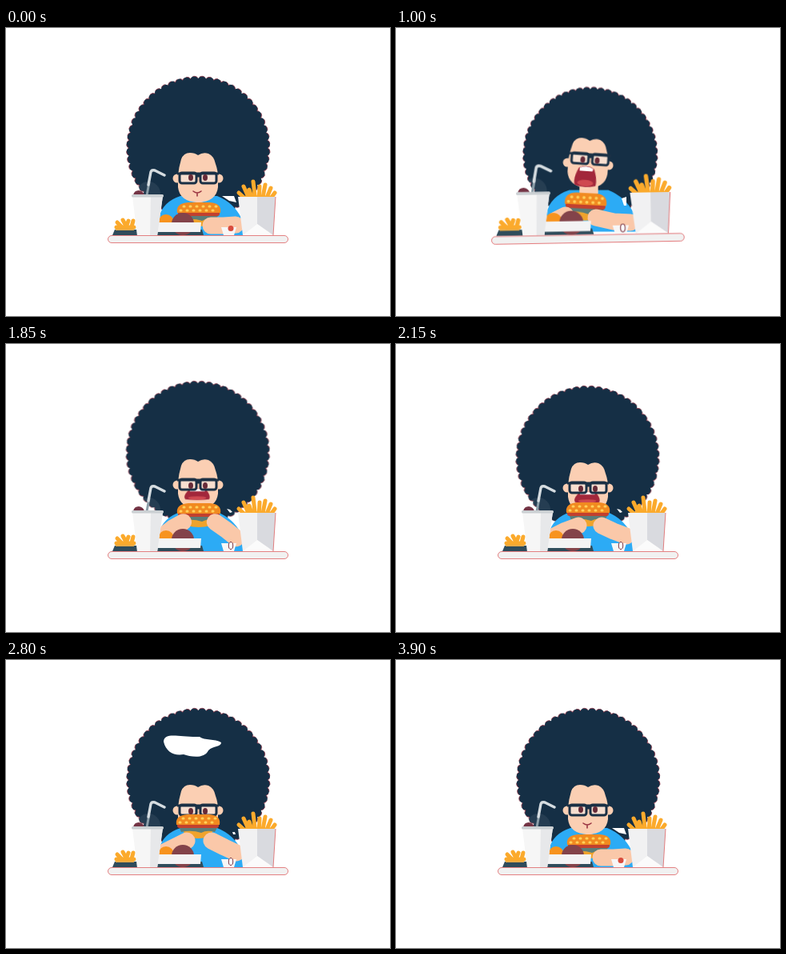
Write an HTML page that moves like this. It is 480x360 px and loops after 3950 ms.

```html
<!DOCTYPE html>
<html lang="en">
<head>
<meta charset="utf-8">
<title>Burger lunch</title>
<style>
html, body { margin: 0; width: 100%; height: 100%; overflow: hidden; background: #fff; }
svg { display: block; width: 100vw; height: 100vh; }
svg * { animation: 3950ms linear infinite; }
.skin { fill: #fbcfb3; }
.arm { fill: none; stroke: #fac8a9; stroke-width: 21; stroke-linecap: round; stroke-linejoin: round; }
.fries path { fill: none; stroke: #fbaa2c; stroke-width: 5; stroke-linecap: round; }
.edge { fill: none; stroke: #df6264; stroke-width: .8; }

#hair { animation-name: hair; transform-origin: 240px 150px; }
#shine { animation-name: shine, shine-on; animation-timing-function: linear, step-end; }
#body { animation-name: body; transform-origin: 242px 250px; }
#face { animation-name: face; transform-origin: 240px 190px; }
#glasses { animation-name: glasses; }
#pupils { animation-name: pupils; }
#bigMouth { animation-name: gape; transform-origin: 238px 204px; }
#smallMouth { animation-name: small-mouth; animation-timing-function: step-end; }
#burger { animation-name: burger; transform-origin: 241px 230px; }
#armL { animation-name: arm-left; }
#armR { animation-name: arm-right; }
#table { animation-name: table; transform-origin: 241px 264px; }
#gap { animation-name: gap; animation-timing-function: step-end; }
#dip { animation-name: dip; animation-timing-function: step-end; }
#ring { animation-name: ring; animation-timing-function: step-end; }

@keyframes hair {
  0%, 1.3%, 86%, 100% { transform: none; }
  6.3% { transform: translate(0, -4px); }
  12.7% { transform: translate(1px, 4px) scale(.96); }
  19%, 26.5% { transform: translate(2.5px, 8px) scale(.94); }
  27.8% { transform: translate(0, -3px); }
  30.4% { transform: translate(0, -16px); }
  34.2% { transform: translate(0, -6px); }
  39.2%, 40.5% { transform: translate(0, 9px); }
  46.8% { transform: translate(-.5px, -14px); }
  54.4%, 55.7% { transform: translate(-.8px, -8px); }
  58.2% { transform: translate(0, -13px); }
  63.3% { transform: translate(0, 5px); }
  70.9%, 72% { transform: none; }
  74.7% { transform: translate(0, -11px); }
  81%, 82.2% { transform: translate(-.5px, 2px); }
}
@keyframes face {
  0%, 1.3%, 70.9%, 72%, 86%, 100% { transform: none; }
  6.3% { transform: translate(0, -4px); }
  12.7% { transform: translate(0, -12px) rotate(2deg); }
  19%, 26.5% { transform: translate(0, -18px) rotate(4deg); }
  30.4% { transform: translate(0, -16px); }
  39.2%, 40.5% { transform: translate(0, 2px); }
  46.8% { transform: translate(0, -12px); }
  54.4%, 55.7% { transform: translate(0, -8px); }
  58.2% { transform: translate(0, -11px); }
  63.3% { transform: translate(0, 3px); }
  74.7% { transform: translate(0, -9px); }
  81%, 82.2% { transform: translate(0, 1px); }
}
@keyframes glasses {
  0%, 6.3%, 30.4%, 100% { transform: none; }
  19%, 26.5% { transform: translate(2px, -6px); }
}
@keyframes pupils {
  0%, 6.3%, 82%, 100% { transform: none; }
  12.7%, 72% { transform: translate(0, 2px); }
}
@keyframes gape {
  0%, 3%, 39.2%, 41%, 63.3%, 72%, 78%, 100% { transform: scale(0); }
  12.7% { transform: scale(.8, .6); }
  19%, 26.5%, 30.4% { transform: none; }
  46.8%, 55.7%, 58.2% { transform: translate(1px, -4px) scale(1.15, .55); }
  74.7% { transform: scale(.8, .4); }
}
@keyframes small-mouth {
  0%, 78%, 100% { opacity: 1; }
  3% { opacity: 0; }
}
@keyframes burger {
  0%, 1.3%, 86%, 100% { transform: none; }
  12.7% { transform: translate(-2px, -6px); }
  19%, 26.5% { transform: translate(-4px, -10px) rotate(3deg) scale(.96, 1.15); }
  30.4% { transform: translate(-1px, -15px); }
  39.2%, 40.5% { transform: translate(0, -27px); }
  46.8% { transform: translate(0, -19px); }
  54.4%, 55.7% { transform: translate(-1px, -20px); }
  58.2% { transform: translate(0, -18px); }
  63.3% { transform: translate(0, -27px); }
  70.9%, 72% { transform: translate(-1px, -25px); }
  74.7% { transform: translate(0, -19px); }
  81%, 82.2% { transform: translate(0, -5px); }
}
@keyframes arm-left {
  0%, 1.3%, 81%, 100% { d: path("M200 254L206 252L212 250"); }
  19%, 26.5% { d: path("M192 247L200 240L212 234"); }
  39.2%, 40.5% { d: path("M199 236L206 227L216 219"); }
  54.4%, 58.2% { d: path("M198 240L212 233L228 227"); }
  63.3% { d: path("M198 238L207 229L218 220"); }
  70.9%, 72% { d: path("M198 240L212 233L226 226"); }
}
@keyframes arm-right {
  0%, 1.3%, 81%, 100% { d: path("M287 246L272 247L256 247"); }
  19%, 26.5% { d: path("M293 243L272 242L250 237"); }
  39.2%, 40.5% { d: path("M288 245L278 231L265 219"); }
  54.4%, 58.2% { d: path("M288 240L272 234L257 227"); }
  63.3% { d: path("M288 244L277 232L264 220"); }
  70.9%, 72% { d: path("M288 241L273 234L257 226"); }
}
@keyframes body {
  0%, 1.3%, 30.4%, 100% { transform: none; }
  19%, 26.5% { transform: translate(0, -5px) scale(1.06); }
}
@keyframes table {
  0%, 1.3%, 27.8%, 100% { transform: none; }
  6.3% { transform: scale(1.04) rotate(.6deg); }
  12.7% { transform: scale(1.07) rotate(-1deg); }
  19% { transform: scale(1.075) rotate(.6deg); }
  24%, 26.5% { transform: translate(0, -.5px) scale(1.07) rotate(-1deg); }
}
@keyframes shine {
  0%, 72% { d: path("M197 102C198 89 218 97 242 96C248 101 261 98 269 103C269 109 259 107 253 113C248 124 231 121 222 118C210 120 200 115 197 102Z"); }
  81%, 100% { d: path("M191 95C190 75 207 76 219 75C235 73 251 76 257 88C266 93 273 98 275 105C267 110 253 112 241 117C222 118 202 118 195 114C190 111 192 104 191 95Z"); }
}
@keyframes shine-on {
  0%, 86%, 100% { opacity: 0; }
  69.6% { opacity: 1; }
}
@keyframes gap {
  0%, 78%, 100% { d: path("M270 210L285 210L288 218L279 216Z"); }
  6.3% { d: path("M282 213L288 211L288 222L285 222Z"); }
  30.4% { d: path("M274 203L279 203L285 209L280 212Z"); }
  44% { d: path("M276 206L280 207L283 210L280 211Z"); }
  63.3% { d: path("M283 215L286 215L287 218L284 218Z"); }
}
@keyframes dip {
  0%, 78%, 100% { opacity: 1; }
  6.3% { opacity: 0; }
}
@keyframes ring {
  0%, 78%, 100% { opacity: 0; }
  6.3% { opacity: 1; }
}
</style>
</head>
<body>
<svg viewBox="0 0 480 360">
  <g id="hair">
    <path id="curls" fill="#152f45" stroke="#8d3144" stroke-width=".8" stroke-dasharray="7 3"/>
    <path id="shine" fill="#fff" opacity="0" d="M197 102C198 89 218 97 242 96C248 101 261 98 269 103C269 109 259 107 253 113C248 124 231 121 222 118C210 120 200 115 197 102Z"/>
  </g>
  <g id="body">
    <path fill="#2cabf5" d="M191 259V237Q196 217 218 210H264Q284 218 294 237L297 259Z"/>
    <path class="skin" d="M230 202H252V214Q241 222 230 214Z"/>
  </g>
  <path id="gap" fill="#fff" d="M270 210L285 210L288 218L279 216Z"/>

  <g id="face">
    <circle class="skin" cx="214" cy="188" r="5.5"/>
    <circle class="skin" cx="266" cy="188" r="5.5"/>
    <path class="skin" d="M215 184Q216 174 219 164Q222 156 230 156Q236 156 240 159Q246 155 253 157Q260 160 262 170Q265 178 265 188V199Q263 217 240 218Q217 217 215 199Z"/>
    <g id="bigMouth">
      <path fill="#a2273b" d="M229 193Q239 188 248 194Q253 207 251 215Q238 219 225 215Q222 207 229 193Z"/>
      <path fill="#fff" d="M230 193Q239 189 247 194L246 197H230Z"/>
      <ellipse cx="238" cy="212" rx="10" ry="4" fill="#cf4951"/>
    </g>
    <g id="smallMouth" fill="none" stroke="#9b3542" stroke-width="1.6" stroke-linecap="round">
      <path d="M234 204Q239 208 244 204M239 206V210"/>
    </g>
    <g id="glasses">
      <g fill="#f7dfd0" stroke="#1a3045" stroke-width="3">
        <rect x="217" y="181" width="21" height="13" rx="3"/>
        <rect x="243" y="181" width="20" height="13" rx="3"/>
        <path d="M214 182H266M238 185H243"/>
      </g>
      <g id="pupils" fill="#662b38">
        <ellipse cx="231" cy="187" rx="3" ry="4"/>
        <ellipse cx="249" cy="187" rx="3" ry="4"/>
      </g>
    </g>
  </g>

  <g id="burger">
    <path fill="#efa32c" d="M222 238H260L256 246Q241 250 226 246Z"/>
    <path fill="#5c7d78" d="M217 233H266L262 240Q252 237 245 241Q233 237 220 240Z"/>
    <rect x="215" y="229" width="52" height="6" rx="3" fill="#c2412f"/>
    <path fill="#f18a20" d="M214 231Q212 219 228 218H255Q270 219 268 231Z"/>
    <path fill="none" stroke="#ffd05a" stroke-width="3" stroke-linecap="round" stroke-dasharray="1 7" d="M222 223H264M218 228H266"/>
  </g>
  <path id="armL" class="arm" d="M200 254L206 252L212 250"/>
  <path id="armR" class="arm" d="M287 246L272 247L256 247"/>

  <g id="table">
    <g class="fries"><path d="M139 243L148 252M146 240L152 251M153 241L149 252M159 241L156 252M138 249H160"/></g>
    <path fill="#2f4c5b" d="M136 252H245L247 259H133Z"/>
    <path fill="#e8aa45" d="M137 251H160V253H137Z"/>
    <circle cx="200" cy="243" r="10" fill="#f7931e"/>
    <circle cx="221" cy="245" r="14" fill="#83434a"/>
    <path fill="#f3f3f4" d="M187 243H244L243 255H187Z"/>

    <circle cx="178" cy="207" r="15" fill="#fff" opacity=".07"/>
    <path fill="#743445" d="M159 209Q160 203 166 203Q172 204 173 209Z"/>
    <path fill="none" stroke="#8b9da8" stroke-width="3" d="M176 209L179 193"/>
    <path fill="none" stroke="#d5dce0" stroke-width="3.4" stroke-linecap="round" stroke-linejoin="round" d="M178 196L181 180Q182 177 186 178L198 184"/>
    <path fill="#f6f6f6" d="M158 210H196L189 260H164Z"/>
    <path fill="#e7e8ea" d="M181 210H196L189 260H180Z"/>
    <rect x="157" y="208" width="40" height="3.5" rx="1.5" fill="#cbd0d3"/>

    <path fill="#f7f7f7" d="M269 249H288L285 259H272Z"/>
    <circle id="dip" cx="281" cy="250.5" r="3.5" fill="#d94b3c"/>
    <ellipse id="ring" cx="281" cy="252" rx="2.7" ry="4.5" fill="#fff" stroke="#77303d" opacity="0"/>

    <g class="fries"><path d="M291 206L303 217M297 198L305 216M304 202L309 217M309 192L312 217M317 198L316 217M324 196L320 217M331 200L324 217M336 206L328 217M300 212H329"/></g>
    <path fill="#f1f1f2" d="M290 211H337L334 259H296Z"/>
    <path fill="#d9dadf" d="M314 211H337L334 259L314 245Z"/>
    <path fill="#fbfbfb" d="M296 259L314 245L334 259Z"/>
    <path class="edge" d="M337 211L334 259"/>
    <rect x="127.5" y="259.5" width="225" height="9" rx="4.5" fill="#f1f1f1"/>
    <rect class="edge" x="127.5" y="259.5" width="225" height="9" rx="4.5"/>
  </g>
</svg>
<script>
// Ring of small outward arcs forming the curly outline.
const bumps = 56, radius = 87;
const point = i => {
  const a = i / bumps * 2 * Math.PI;
  return `${(240.3 + radius * Math.cos(a)).toFixed(2)} ${(150 + radius * Math.sin(a)).toFixed(2)}`;
};
let outline = `M${point(0)}`;
for (let i = 1; i <= bumps; i++) outline += `A5.5 5.5 0 0 1 ${point(i)}`;
document.getElementById("curls").setAttribute("d", outline + "Z");
</script>
</body>
</html>
```
